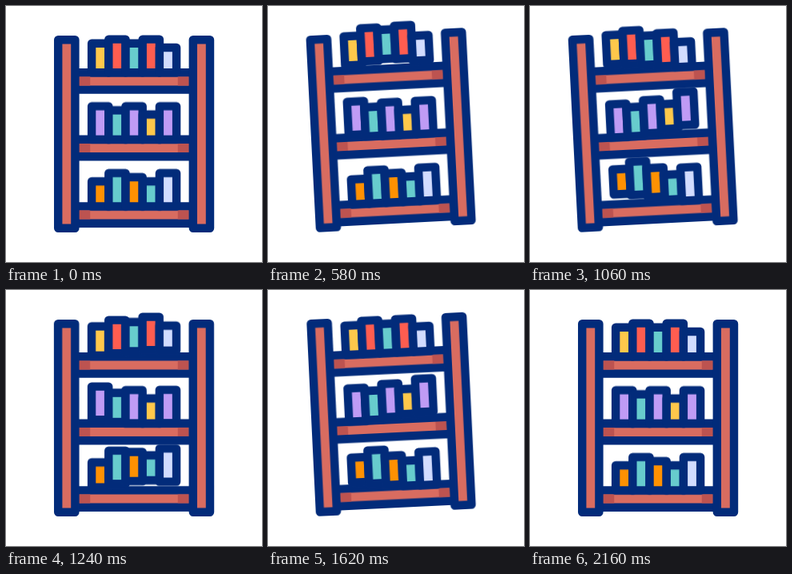
Animation of 320x320 px, one loop 2.36 s. Source, as an HTML page without scripts:

```html
<!DOCTYPE html>
<html lang="en">
<head>
<meta charset="utf-8">
<title>Bookshelf</title>
<style>
  html, body { margin: 0; width: 100%; height: 100%; overflow: hidden; background: #fff; }
  svg { display: block; width: 100vw; height: 100vh; }

  .line { stroke: #022b7a; stroke-width: 10.4; stroke-linejoin: round; }
  .wood { fill: #d96c60; }
  .shade { fill: #bd5350; }
  .yellow { fill: #ffc84b; }
  .red { fill: #ff5d50; }
  .teal { fill: #67cccd; }
  .pale { fill: #d2dcff; }
  .purple { fill: #bf9bf5; }
  .orange { fill: #ff9102; }

  .case {
    transform-origin: 60px 283px;
    animation: tilt 2360ms cubic-bezier(.37, 0, .63, 1) infinite;
  }
  /* Books hop one after another, row after row */
  .books rect {
    animation: hop 2360ms cubic-bezier(.37, 0, .63, 1) infinite;
    animation-delay: calc(var(--row) * 310ms + var(--i) * 60ms);
  }
  .books rect:nth-child(1) { --i: 0; }
  .books rect:nth-child(2) { --i: 1; }
  .books rect:nth-child(3) { --i: 2; }
  .books rect:nth-child(4) { --i: 3; }
  .books rect:nth-child(5) { --i: 4; }

  @keyframes tilt {
    0%, 7.63% { transform: rotate(0deg); }
    38.14% { transform: rotate(-5deg); }
    53.39% { transform: rotate(0deg); }
    66.1% { transform: rotate(-3deg); }
    80.51%, 100% { transform: rotate(0deg); }
  }
  @keyframes hop {
    0%, 7.63% { transform: translateY(0); }
    19.07% { transform: translateY(-12.5px); }
    30.51%, 33.47% { transform: translateY(0); }
    44.49% { transform: translateY(-8px); }
    55.51%, 100% { transform: translateY(0); }
  }
</style>
</head>
<body>
<svg viewBox="0 0 320 320">
  <defs>
    <g id="board">
      <rect class="line wood" x="86" y="83.2" width="148" height="21.4"/>
      <path class="shade" d="M91.2 88.4h14v11h-14zM214.8 88.4h14v11h-14z"/>
    </g>
    <rect id="post" class="line wood" x="65.2" y="42.3" width="21.2" height="235.4"/>
  </defs>

  <g class="case">
    <use href="#board"/>
    <use href="#board" y="83.6"/>
    <use href="#board" y="167.2"/>

    <g class="books line" style="--row: 0">
      <rect class="yellow" x="107.1" y="46.8" width="21.2" height="36.4"/>
      <rect class="red" x="128.3" y="41.6" width="21.2" height="41.6"/>
      <rect class="teal" x="149.5" y="46.8" width="21.2" height="36.4"/>
      <rect class="red" x="170.7" y="41.6" width="21.2" height="41.6"/>
      <rect class="pale" x="191.9" y="52" width="21.2" height="31.2"/>
    </g>
    <g class="books line" style="--row: 1" transform="translate(0 83.6)">
      <rect class="purple" x="107.1" y="41.6" width="21.2" height="41.6"/>
      <rect class="teal" x="128.3" y="46.8" width="21.2" height="36.4"/>
      <rect class="purple" x="149.5" y="41.6" width="21.2" height="41.6"/>
      <rect class="yellow" x="170.7" y="52" width="21.2" height="31.2"/>
      <rect class="purple" x="191.9" y="41.6" width="21.2" height="41.6"/>
    </g>
    <g class="books line" style="--row: 2" transform="translate(0 167.2)">
      <rect class="orange" x="107.1" y="52" width="21.2" height="31.2"/>
      <rect class="teal" x="128.3" y="41.6" width="21.2" height="41.6"/>
      <rect class="orange" x="149.5" y="46.8" width="21.2" height="36.4"/>
      <rect class="teal" x="170.7" y="52" width="21.2" height="31.2"/>
      <rect class="pale" x="191.9" y="41.6" width="21.2" height="41.6"/>
    </g>

    <use href="#post"/>
    <use href="#post" x="168.6"/>
  </g>
</svg>
</body>
</html>
```
